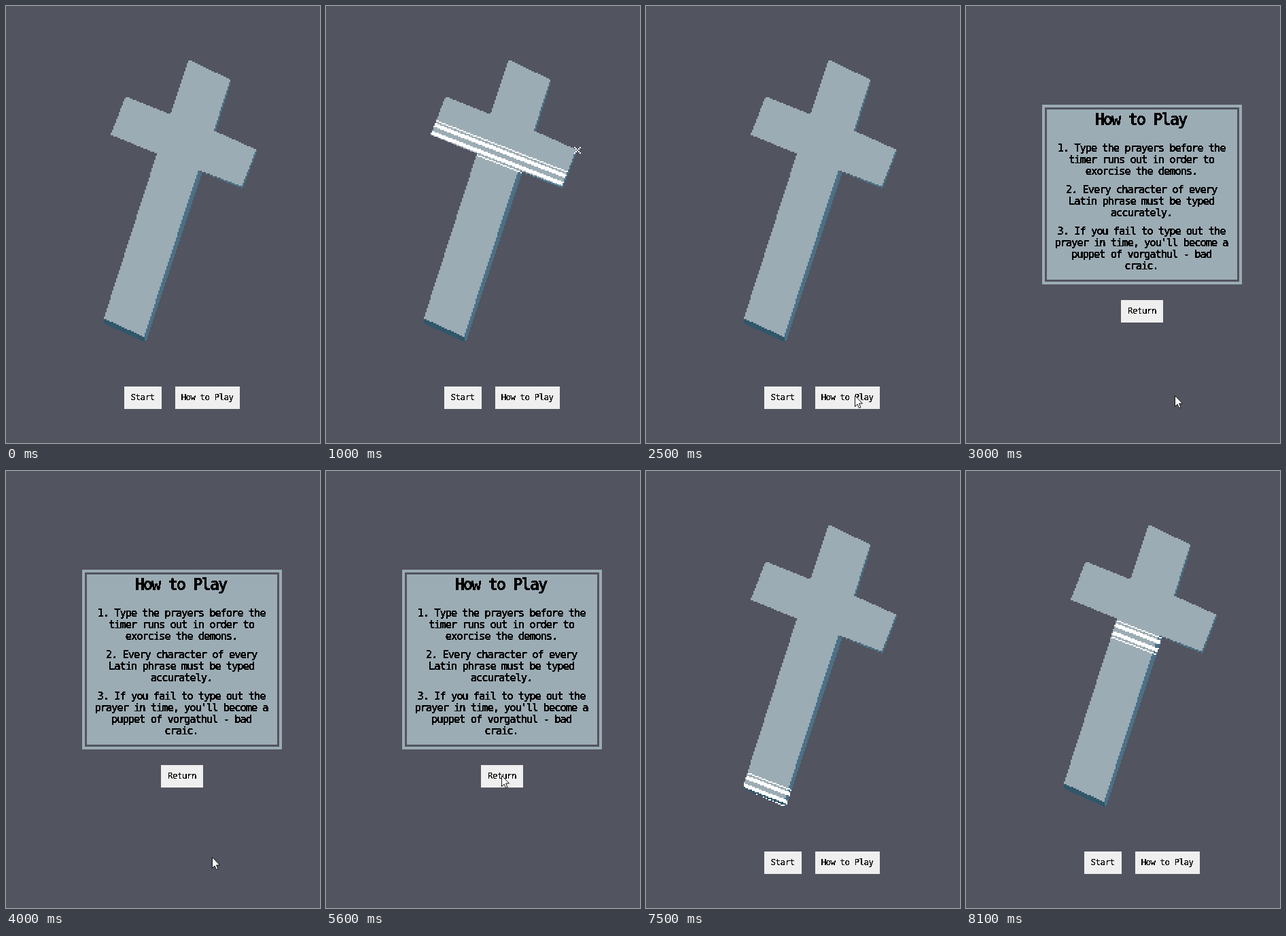
An HTML page that plays this animation: 462x642 px, repeating every 8200 ms.

```html
<!DOCTYPE html>
<html lang="en">
<head>
<meta charset="utf-8">
<title>How to Play</title>
<style>
  html, body { margin: 0; width: 100%; height: 100%; overflow: hidden; background: #525460; }
  svg { display: block; width: 462px; height: 642px; }
  path, rect { shape-rendering: crispEdges; }
  text {
    font: 12.5px "DejaVu Sans Mono", monospace; letter-spacing: -.55px;
    text-anchor: middle; fill: #050505; stroke: #050505; stroke-width: .2px; filter: url(#crisp);
  }
  .body { font-size: 15.5px; letter-spacing: -1.1px; stroke-width: .5px; }
  .title { font-size: 24px; font-weight: bold; letter-spacing: -2.2px; stroke-width: 0; }
  .button { fill: #efefef; }
</style>
</head>
<body>
<svg viewBox="0 0 462 642">
  <filter id="crisp" x="-5%" y="-20%" width="110%" height="140%">
    <feComponentTransfer><feFuncA type="discrete" tableValues="0 1"/></feComponentTransfer>
  </filter>
  <clipPath id="clip"><path id="outline"/></clipPath>
  <g id="menu">
    <g id="cross"></g>
    <g clip-path="url(#clip)"><path id="shine" fill="#fff"/></g>
    <path id="spark" fill="#fff"/>
    <rect class="button" x="174" y="559" width="55" height="33"/>
    <text x="201" y="579">Start</text>
    <rect class="button" x="249" y="559" width="95" height="33"/>
    <text x="296" y="579">How to Play</text>
  </g>
  <g id="help">
    <rect x="112" y="145" width="294" height="264" fill="#9cacb4"/>
    <rect x="117.5" y="150.5" width="283" height="253" fill="none" stroke="#525460" stroke-width="3"/>
    <text class="title" x="257" y="175">How to Play</text>
    <g id="rules"></g>
    <rect class="button" x="228" y="432" width="62" height="33"/>
    <text x="259" y="452">Return</text>
  </g>
  <path id="cursor" d="M.5 .5V16.5L4 13L6.5 18.5L9 17.5L6.5 12H11.5Z" fill="#fff" stroke="#111"
    style="shape-rendering:auto"/>
</svg>
<script>
const $ = id => document.getElementById(id);
const LOOP = 8200, STEP = 100, PIXEL = 2, SLOPE = .39;

// Scan-converts a polygon into a path of chunky pixel rows.
function pixelate(points) {
  const ys = points.map(p => p[1]);
  const snap = v => Math.round(v / PIXEL) * PIXEL;
  let d = '';
  for (let y = snap(Math.min(...ys)); y < Math.max(...ys); y += PIXEL) {
    const mid = y + PIXEL / 2, hits = [];
    points.forEach(([x1, y1], i) => {
      const [x2, y2] = points[(i + 1) % points.length];
      if ((y1 <= mid) !== (y2 <= mid)) hits.push(x1 + (mid - y1) * (x2 - x1) / (y2 - y1));
    });
    hits.sort((a, b) => a - b);
    for (let i = 0; i < hits.length; i += 2) {
      const left = snap(hits[i]), right = snap(hits[i + 1]);
      if (right > left) d += `M${left} ${y}H${right}v${PIXEL}H${left}Z`;
    }
  }
  return d;
}

const SIDE = '#4b7086', DARK = '#30566a', FACE = '#9cacb4';
const parts = [
  [SIDE, [[329, 108], [331, 112], [308, 185], [305, 183]]],
  [SIDE, [[367, 211], [370, 212], [348, 268], [284, 243], [346, 264]]],
  [SIDE, [[282, 241], [289, 244], [206, 494], [202, 486]]],
  [DARK, [[144, 458], [204, 485], [205, 494], [143, 466]]],
  [FACE, [[269, 79], [330, 108], [306, 183], [368, 211], [347, 265], [283, 241],
          [203, 486], [144, 459], [222, 217], [154, 189], [176, 133], [242, 159]]]
];
const shapes = parts.map(([fill, points]) => [fill, pixelate(points)]);
$('cross').innerHTML = shapes.map(([fill, d]) => `<path fill="${fill}" d="${d}"/>`).join('');
// The shine skips the thin sides of the top and the arm.
$('outline').setAttribute('d', shapes.slice(2).map(s => s[1]).join(''));

const rules = [
  ['1. Type the prayers before the', 'timer runs out in order to', 'exorcise the demons.'],
  ['2. Every character of every', 'Latin phrase must be typed', 'accurately.'],
  ['3. If you fail to type out the', "prayer in time, you'll become a", 'puppet of vorgathul - bad', 'craic.']
];
$('rules').innerHTML = rules.map((lines, i) => lines.map((line, j) =>
  `<text class="body" x="258" y="${214 + i * 61 + j * 17}">${line}</text>`).join('')).join('');

// Each band: vertical offset from the sweep's centre, and thickness.
const bands = [[-13, 2], [-6, 6], [7, 6], [14, 2]];
function shinePath(centre) {
  if (centre < 0 || centre > 530) return '';
  const at = (x, y) => [x, y + (x - 222) * SLOPE];
  return bands.map(([offset, size]) => {
    const top = centre + offset - size / 2, bottom = top + size;
    return pixelate([at(130, top), at(380, top), at(380, bottom), at(130, bottom)]);
  }).join('');
}

function sparkPath(radius) {
  let d = '';
  for (let i = -radius; i <= radius; i += PIXEL)
    for (const j of [i, -i]) d += `M${369 + i} ${211 + j}h2v2h-2Z`;
  return d;
}

function cursorAt(t) {
  const glide = (from, to, p) => from.map((v, i) => v + (to[i] - v) * p);
  if (t < 1900 || t >= 7100) return null;
  if (t < 2500) return glide([357, 636], [307, 572], 1 - (1 - (t - 1900) / 600) ** 2);
  if (t < 3500) return [307, 572];
  const p = Math.min(1, Math.max(0, (t - 4900) / 700));
  return glide([303, 567], [258, 447], p * p * (3 - 2 * p));
}

const show = (id, on) => $(id).style.display = on ? '' : 'none';

function frame(now) {
  const t = Math.floor(now % LOOP / STEP) * STEP;
  const help = t >= 3000 && t < 6000;
  show('menu', !help);
  show('help', help);

  const centre = t < 6000 ? 205 - .42 * (t - 1000) : 233 - .42 * (t - 8100);
  $('shine').setAttribute('d', shinePath(centre));
  const radius = { 1000: 4, 1100: 10, 1200: 6 }[t];
  $('spark').setAttribute('d', radius ? sparkPath(radius) : '');

  const spot = cursorAt(t);
  show('cursor', spot);
  if (spot) $('cursor').setAttribute('transform', `translate(${spot.map(Math.round)})`);
  requestAnimationFrame(frame);
}
frame(performance.now());
</script>
</body>
</html>
```
